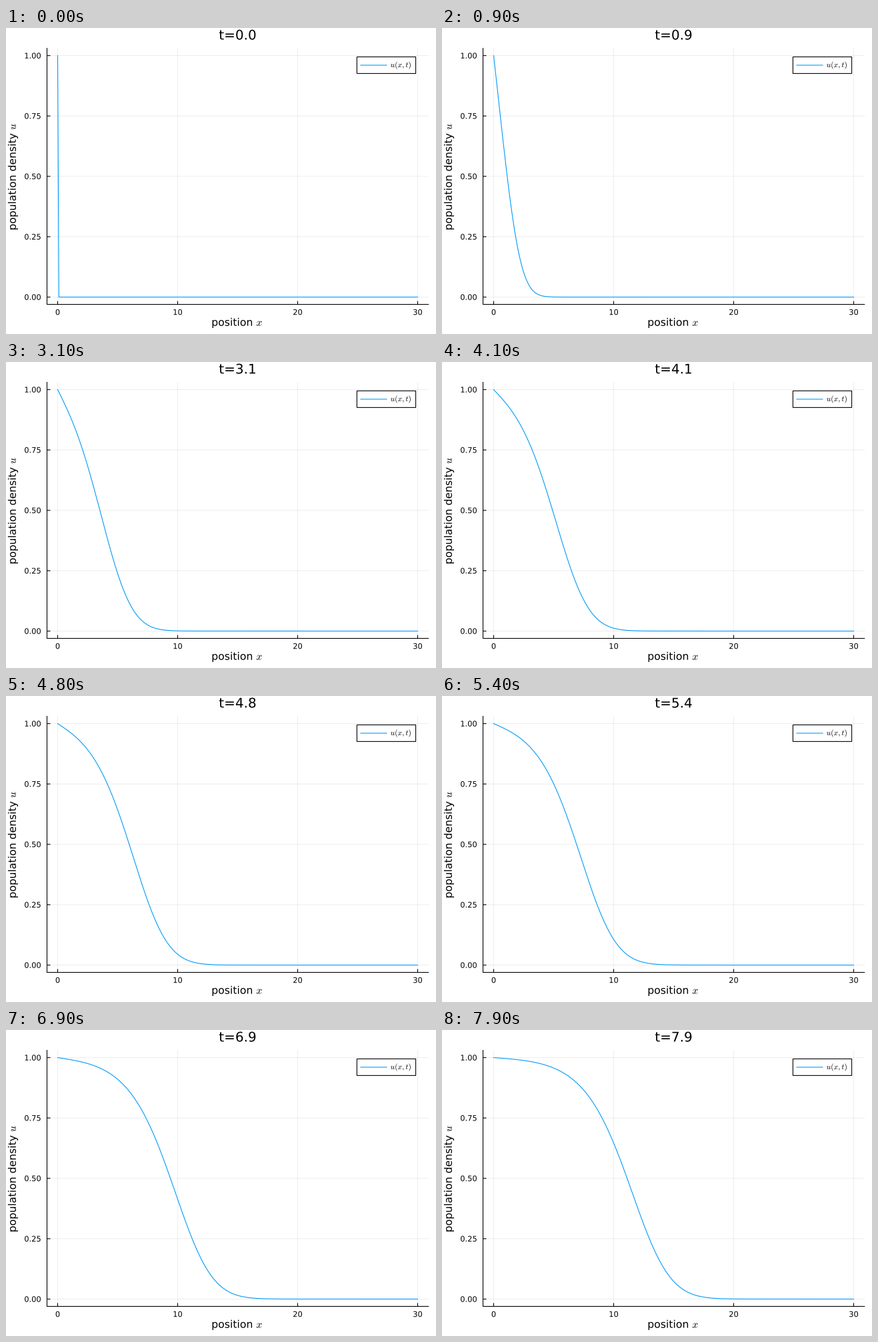
A matplotlib script for the animation above (8 s loop, 645 px wide and 460 px high).

```python
import numpy as np
import matplotlib.pyplot as plt
from matplotlib.animation import FuncAnimation
from matplotlib.patches import PathPatch, Rectangle
from matplotlib.textpath import TextPath
from matplotlib.transforms import Affine2D

plt.rcParams["font.family"] = "DejaVu Sans"
plt.rcParams["mathtext.fontset"] = "cm"

W, H, DPI = 645, 460, 80
PX = 72 / DPI  # points per pixel
FRAMES, STEP = 80, 0.1
TITLE, LABEL, TICK = 20, 15.7, 11.42  # font sizes in pixels
LEFT, RIGHT, TOP, BOTTOM = 61.5, 633.7, 30.5, 415.5
BLUE = "#009afa"


def solve(dx=0.1, dt=0.002):
    """Fisher-KPP equation u_t = u_xx + u(1 - u) with u(0) = 1."""
    x = np.arange(301) * dx
    u = np.zeros_like(x)
    u[0] = 1
    states = [u.copy()]
    for _ in range(FRAMES - 1):
        for _ in range(round(STEP / dt)):
            mid = u[1:-1]
            lap = (u[2:] - 2 * mid + u[:-2]) / dx**2
            u[1:-1] = mid + dt * (lap + mid * (1 - mid))
        states.append(u.copy())
    return x, states


def to_x(x):
    return 77.5 + 18 * x


def to_y(u):
    return 404.5 - 363 * u


def glyphs(x, y, s, size, angle=0):
    place = Affine2D().scale(1, -1).rotate_deg(-angle).translate(x, y)
    return TextPath((0, 0), s, size=size).transformed(place)


fig = plt.figure(figsize=(W / DPI, H / DPI), dpi=DPI, facecolor="white")
ax = fig.add_axes([0, 0, 1, 1])
ax.set_xlim(0, W)
ax.set_ylim(H, 0)
ax.axis("off")


def text(x, y, s, size, angle=0):
    patch = PathPatch(glyphs(x, y, s, size, angle), fc="black", lw=0, zorder=5)
    return ax.add_patch(patch)


def line(xs, ys, color="black", width=1.1, **kw):
    return ax.plot(xs, ys, color=color, lw=width * PX, snap=False, **kw)[0]


# grid, ticks and tick labels
for v in (0, 10, 20, 30):
    px = to_x(v)
    line([px, px], [TOP, BOTTOM], width=1, alpha=0.07)
    line([px, px], [BOTTOM, BOTTOM - 5], solid_capstyle="butt")
    text(px - len(str(v)) * 0.318 * TICK, 431.2, str(v), TICK)
for v in (0, 0.25, 0.5, 0.75, 1):
    py = to_y(v)
    line([LEFT, RIGHT], [py, py], width=1, alpha=0.07)
    line([LEFT, LEFT + 5], [py, py], solid_capstyle="butt")
    text(27.3, py + 4.2, f"{v:.2f}", TICK)
line([LEFT, LEFT, RIGHT], [TOP, BOTTOM, BOTTOM])

# axis labels
text(308.2, 447.7, "position", LABEL)
text(375.4, 447.7, "$x$", LABEL)
text(14.8, 304.2, "population density", LABEL, 90)
text(14.8, 153.1, "$u$", LABEL, 90)

# legend
ax.add_patch(Rectangle((526.4, 43.4), 88.2, 25, fc="white", ec="black",
                       lw=1.1 * PX, snap=False, zorder=4))
line([532, 571], [55.9, 55.9], BLUE, zorder=5)
text(576.7, 58.9, "$u(x,t)$", TICK)

x, states = solve()
curve = line(to_x(x), to_y(states[0]), BLUE, zorder=3)
title = text(319.3, 17.4, "t=0.0", TITLE)


def draw(i):
    curve.set_ydata(to_y(states[i]))
    title.set_path(glyphs(319.3, 17.4, f"t={i * STEP:.1f}", TITLE))
    return curve, title


anim = FuncAnimation(fig, draw, frames=FRAMES, interval=100, repeat=True)
plt.show()
```
